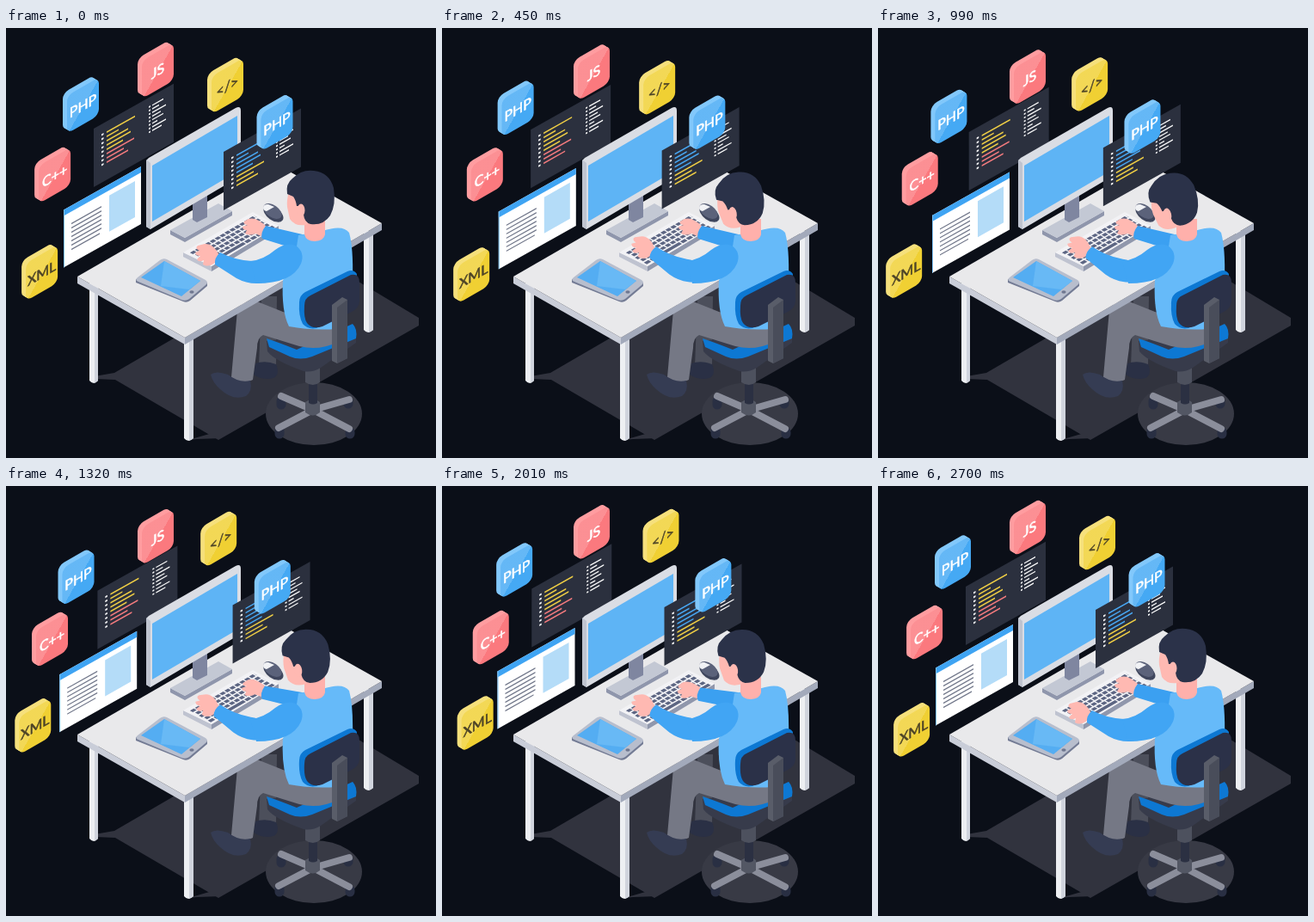
An HTML page that plays this animation: 500 px wide and 500 px high, repeating every 2760 ms.

```html
<!DOCTYPE html>
<html lang="en">
<head>
<meta charset="utf-8">
<title>Developer at a desk</title>
<style>
html, body { margin: 0; width: 100%; height: 100%; overflow: hidden; background: #0b0f18; }
svg { display: block; width: 100vw; height: 100vh; }
text { font-family: Lato, "Open Sans", sans-serif; font-size: 16px; text-anchor: middle; stroke-width: .55px; }
</style>
</head>
<body>
<svg viewBox="0 0 500 500">
  <defs>
    <linearGradient id="shine" x1="0" y1="0" x2="1" y2="1">
      <stop offset=".52" stop-color="#fff" stop-opacity=".17"/>
      <stop offset=".52" stop-color="#fff" stop-opacity="0"/>
    </linearGradient>
  </defs>
  <rect width="500" height="500" fill="#0b0f18"/>

  <g id="floor" fill="#31333e">
    <path d="M103 405L126 401L360 265L480 337V346L247 479L127 409L104 408Z"/>
    <path d="M212 479L240 471L250 477L222 478Z"/>
    <ellipse cx="358" cy="448.5" rx="56" ry="36.5" fill="#383a45"/>
  </g>

  <g id="back"></g>

  <g id="legs">
    <path d="M297 312H315L314 394H294Z" fill="#4c4f5b"/>
    <path d="M290 390Q302 386 314 391Q319 403 311 407Q298 410 288 403Z" fill="#2a3045"/>
    <g stroke="#8b8e9b" stroke-width="8" stroke-linecap="round">
      <g stroke="#292f43" stroke-width="11">
        <path d="M320 434V438M398 434V437M318 468V472M400 470V472"/>
      </g>
      <path d="M357 444L320 428M357 444L399 432M357 444L317 465M357 444L399 466"/>
    </g>
    <path d="M348 435Q357 428 365 435V447Q357 454 348 447Z" fill="#535764"/>
    <path d="M352 412H362V436Q357 439 352 436Z" fill="#2b3042"/>
    <path d="M348 385H365V412Q357 418 348 412Z" fill="#4d515e"/>
    <path d="M303 364L304 376Q312 387 346 399Q356 401 366 395L407 366V352Z" fill="#373b4b"/>
    <path d="M303 361Q318 366 338 374L403 344Q409 350 407 361L356 382Q342 387 330 382L306 371Z" fill="#0d78d3"/>
    <path d="M262 406L269 328Q274 316 292 318L322 330Q350 340 384 343L386 365Q364 376 341 370L299 357Q292 360 292 372L287 409Q275 416 262 406Z" fill="#757885"/>
    <path d="M238 403Q244 398 258 403Q271 413 284 410Q287 422 279 428Q264 434 249 420Q240 412 238 403Z" fill="#353c53"/>
  </g>

  <g id="desk">
    <path d="M97 296H107V410Q102 416 97 410ZM207 360H218V477Q212 483 207 477ZM416 236H427V351Q421 357 416 351Z" fill="#edeff2"/>
    <path d="M103 296H107V410L103 413ZM213 360H218V477L213 480ZM422 236H427V351L422 354Z" fill="#d0d4dd"/>
    <path d="M83 289L208 360V368L83 297Z" fill="#c9cdd8"/>
    <path d="M437 227L208 360V368L437 235Z" fill="#a3aabb"/>
    <path d="M83 289L312 157L437 227L208 360Z" fill="#e9e9eb"/>
  </g>

  <g id="monitor">
    <path d="M191 235V240L208 249L263 218V213L208 244Z" fill="#8f96ac"/>
    <path d="M191 235L247 204L263 213L208 244Z" fill="#c3c8d4"/>
    <path d="M217 200L234 192V220L222 226L217 223Z" fill="#7f86a0"/>
    <path d="M163 156Q163 153 166 151L267 93Q273 90 273 96V172L168 234L163 231Z" fill="#dadde4"/>
    <path d="M163 153L168 157V234L163 231Z" fill="#bfc4d0"/>
    <path d="M170 160L269 102V167L170 225Z" fill="#5eb4f5"/>
  </g>

  <g id="keyboard">
    <path d="M206 261V266L239 283V277Z" fill="#bfc3d0"/>
    <path d="M239 277V283L317 236V230Z" fill="#9097ac"/>
    <path d="M206 261L287 214L317 230L239 277Z" fill="#f2f2f5"/>
    <g id="keys" transform="matrix(.866 -.5 .866 .48 210 261)" stroke="#5d6683" stroke-width="4" fill="none"></g>
  </g>

  <g id="mouse">
    <ellipse cx="311" cy="216" rx="13" ry="7.5" transform="rotate(35 311 216)" fill="#3f465d"/>
    <ellipse cx="310" cy="213" rx="12" ry="7" transform="rotate(35 310 213)" fill="#5b627a"/>
    <path d="M299 209Q299 205 305 205L312 208L303 213Q299 212 299 209Z" fill="#f1f2f5"/>
  </g>

  <g id="tablet">
    <path d="M151 292V296L206 318Q210 320 214 317L234 300V296Z" fill="#737b94"/>
    <path d="M153 290L179 270Q183 267 187 269L232 293Q236 296 232 299L213 315Q209 318 204 316L154 295Q149 293 153 290Z" fill="#b8becd"/>
    <path d="M157 290L184 271L226 294L204 312Z" fill="#54adf2"/>
    <path d="M184 271L226 294L213 304L180 300Z" fill="#68b9f5"/>
    <ellipse cx="216" cy="307" rx="2.6" ry="1.8" fill="#6f7790"/>
  </g>

  <g id="front"></g>

  <g id="person">
    <g id="armR">
      <path d="M303 231Q291 219 282 222L277 225Q275 228 281 229L275 231Q275 235 280 235L278 239Q283 242 290 239L299 243Z" fill="#ffb9b2"/>
      <path d="M302 230L349 241L343 259L298 245Q295 239 302 230Z" fill="#3ba0f1"/>
    </g>
    <path d="M340 241L368 236Q392 228 399 238Q404 256 403 291L384 350Q356 352 329 347Q320 329 322 293L334 280Z" fill="#66baf9"/>
    <path d="M347 222H371V240Q370 247 359 248Q349 248 347 240Z" fill="#ffb0ab"/>
    <g id="armL">
      <path d="M248 264Q241 250 231 251L223 253Q219 256 225 259L220 261Q220 265 226 265L222 269Q224 273 230 270L229 275Q235 279 243 273Z" fill="#ffb9b2"/>
      <path d="M249 261Q266 270 286 271Q304 271 309 283Q306 297 291 297Q279 297 268 291L243 275Q242 267 249 261Z" fill="#41a5f4"/>
    </g>
    <path d="M284 271Q299 270 313 258Q325 249 337 253Q348 261 343 274Q333 297 291 297Z" fill="#41a5f4"/>
    <g id="head">
      <path d="M329 190Q326 201 327 208L330 222Q336 231 349 229L366 216L360 188Z" fill="#ffb9b2"/>
      <path d="M327 193Q325 181 333 175Q344 164 358 166Q376 168 381 186Q384 205 377 218Q369 230 354 228Q347 226 346 217L345 207H338Q337 200 334 196Z" fill="#2b3249"/>
      <ellipse cx="343" cy="212" rx="4.5" ry="7.5" fill="#ffb9b2"/>
    </g>
  </g>

  <g id="chair">
    <path d="M341 319Q341 311 348 307L397 283Q404 280 408 286L404 326L361 349Q351 351 345 344Q340 335 341 319Z" fill="#0d78d3"/>
    <path d="M347 323Q347 314 354 311L401 287Q411 285 411 296V318Q410 326 402 330L368 347Q356 351 350 343Q346 337 347 323Z" fill="#2b3148"/>
    <path d="M379 322L391 313L397 316V384L385 390L379 387Z" fill="#595d69"/>
    <path d="M385 325L397 316V384L385 390Z" fill="#494d5a"/>
  </g>
</svg>
<script>
const LOOP = 2760, STEP = 30, CYCLE = 2700;
const $ = id => document.getElementById(id);

function add(parent, tag, attrs, text) {
  const node = document.createElementNS("http://www.w3.org/2000/svg", tag);
  for (const k in attrs) node.setAttribute(k, attrs[k]);
  if (text) node.textContent = text;
  parent.appendChild(node);
  return node;
}

const line = (g, x, y, len, color, width = 1.7) =>
  add(g, "path", { d: `M${x} ${y}h${len}`, stroke: color, "stroke-width": width, fill: "none" });

// Keyboard rows
for (let r = 0; r < 5; r++)
  add($("keys"), "path", {
    d: `M${2 + r % 2} ${4.5 + r * 6}H88`,
    "stroke-dasharray": r == 4 ? "6 1.6 6 1.6 32 1.6 6 1.6" : "5 1.6"
  });

// Floating windows sway between two places
const movers = [];

function sheet(layer, x, y, dx, dy) {
  const g = add($(layer), "g", {});
  movers.push({ g, pos: sway(x, y, dx, dy) });
  return add(g, "g", { transform: "skewY(-29.3)" });
}

function codePanel(layer, x, y, w, dx, dy, first, second) {
  const g = sheet(layer, x, y, dx, dy);
  add(g, "rect", { width: w, height: 68, fill: "#2b303e" });
  [33, 14, 25, 28, 19, 32, 20, 25].forEach((len, i) => {
    line(g, 9, 12.5 + i * 5, 2.5, "#fff", 2);
    line(g, 15, 12.5 + i * 5, len, i < 5 ? first : second);
  });
  [13, 8, 16, 10, 13, 6, 16, 11].forEach((len, i) => {
    line(g, w - 29, 11 + i * 4.2, 2, "#fff");
    line(g, w - 25, 11 + i * 4.2, len, "#fff", 1.4);
  });
}

function browser() {
  const g = sheet("back", 67, 211.5, -4.8, 7.7);
  add(g, "rect", { width: 90, height: 67, fill: "#fff" });
  add(g, "rect", { width: 90, height: 7, fill: "#3fa4f3" });
  add(g, "rect", { width: 1, height: 67, fill: "#7cc2f6" });
  add(g, "rect", { x: 53, y: 13, width: 30, height: 42, fill: "#b4dcf8" });
  for (let i = 0; i < 7; i++) line(g, 9, 21 + i * 5, i == 6 ? 33 : 35, "#707689", 1.4);
}

// Rounded isometric tile; pos gives its top-left corner
function tile(layer, label, face, side, ink, pos) {
  const g = add($(layer), "g", {});
  const rect = (x, y, fill) => add(g, "rect", {
    width: 37, height: 44, rx: 7, fill,
    transform: `translate(${x} ${y}) skewY(-30)`
  });
  for (let i = 0; i < 5; i++) rect(i, 19.2 + i * .6, side);
  rect(5, 22.2, face);
  rect(5, 22.2, "url(#shine)");
  add(g, "text", {
    x: 18.5, y: 28, fill: ink, stroke: ink,
    transform: "translate(5 22.2) skewY(-30)"
  }, label);
  movers.push({ g, pos });
}

const sway = (x, y, dx, dy) => c => [x + dx * (1 - c) / 2, y + dy * (1 - c) / 2];
const orbit = (x, y, xc, xs, yc, ys) => (c, s) => [x + xc * c + xs * s, y + yc * c + ys * s];

const blue = ["#45a9f4", "#82c8fb", "#fff"];
const red = ["#fb797e", "#ff9da0", "#fff"];
const gold = ["#f0d033", "#f6e07c", "#4c4327"];

codePanel("back", 102, 117, 93, 4.4, 4.8, "#f0cf45", "#f57b7e");
browser();
tile("back", "JS", ...red, sway(153, 16, 0, 10.2));
tile("back", "PHP", ...blue, sway(66, 56.5, -5.5, 17.2));
tile("back", "C++", ...red, orbit(31.7, 142, 1.4, -4.1, -4, -1.9));
tile("back", "XML", ...gold, orbit(14.3, 248.6, 3.8, -3.5, 2.7, 5.1));
codePanel("front", 253, 144, 90, 10.6, -5.6, "#48a8f4", "#f0cf45");
tile("front", "</>", ...gold, orbit(230.2, 31.3, 3.8, -3.4, 2.7, 5.2));
tile("front", "PHP", ...blue, orbit(290.3, 81.3, 1.2, -4.1, -4, -1.9));

// Eased value between [time, value] keys
function keyed(keys, t) {
  const i = Math.max(1, keys.findIndex(k => k[0] >= t));
  const [t0, a] = keys[i - 1], [t1, b] = keys[i];
  const u = (t - t0) / (t1 - t0);
  return a + (b - a) * u * u * (3 - 2 * u);
}

const headKeys = [[0, 0], [680, 1], [990, 1], [1640, 0], [2370, 1], [2700, 0]];
const leftKeys = [[0, 0], [420, 1], [2010, 1], [2310, 0], [2700, 0]];
const rightKeys = [[0, 0], [990, 0], [1590, 1], [2310, 1], [2700, 0]];

function draw(ms) {
  const t = Math.min(CYCLE, Math.floor(ms % LOOP / STEP) * STEP);
  const a = t / CYCLE * 2 * Math.PI, c = Math.cos(a), s = Math.sin(a);
  for (const { g, pos } of movers) {
    const [x, y] = pos(c, s);
    g.setAttribute("transform", `translate(${x.toFixed(2)} ${y.toFixed(2)})`);
  }
  const h = keyed(headKeys, t), l = keyed(leftKeys, t), r = keyed(rightKeys, t);
  $("head").setAttribute("transform", `translate(${-2 * h} ${h}) rotate(${-14 * h} 357 232)`);
  $("armL").setAttribute("transform", `translate(${-3 * l} ${-l}) rotate(${7 * l} 297 284)`);
  $("armR").setAttribute("transform", `rotate(${-6 * r} 343 248)`);
}

const start = performance.now();
function tick() {
  draw(performance.now() - start);
  requestAnimationFrame(tick);
}
tick();
</script>
</body>
</html>
```
